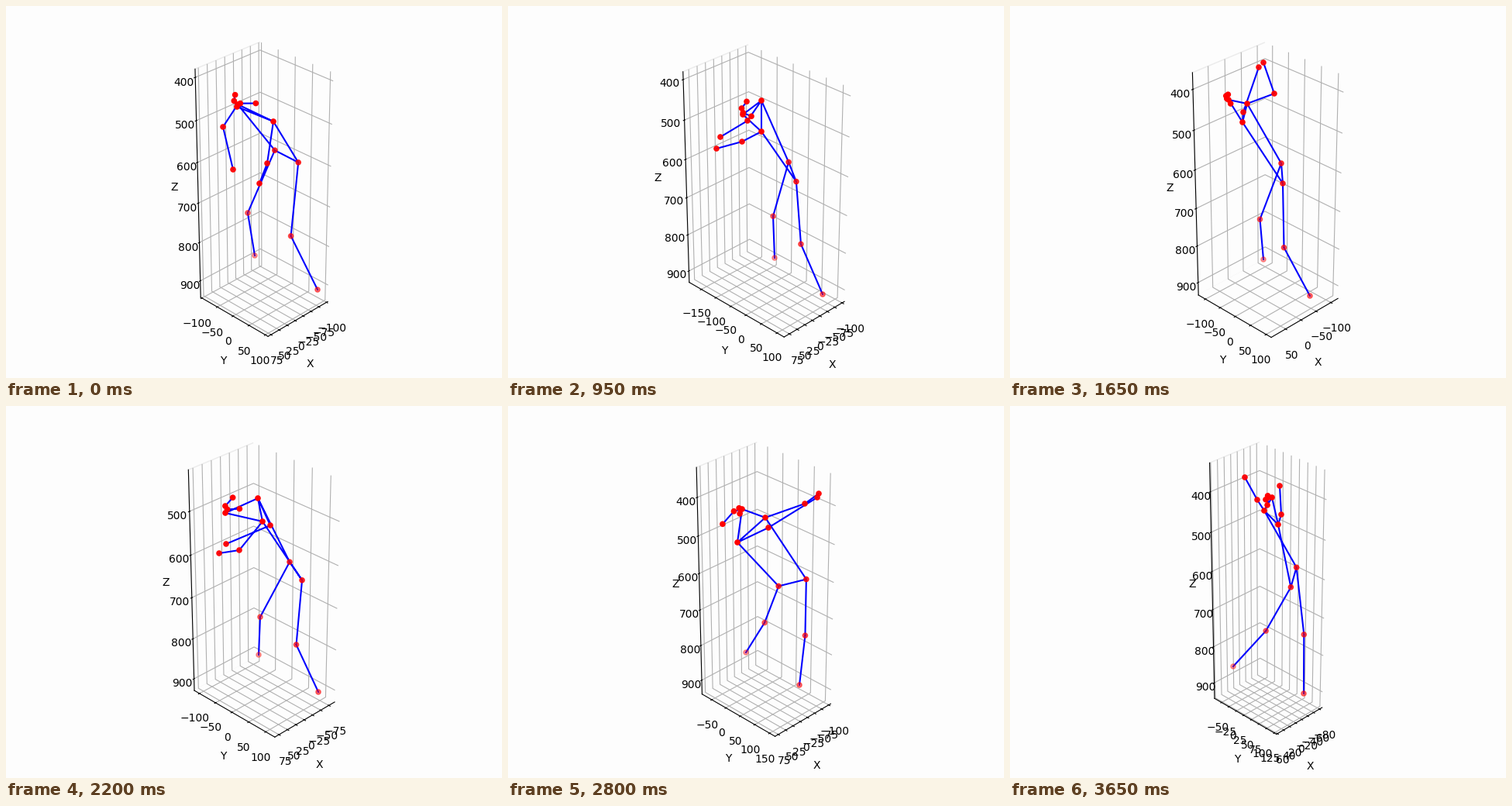
Write a matplotlib script that moves like this. It is 640x480 px and loops after 3700 ms.

```python
import numpy as np
import matplotlib.pyplot as plt
from matplotlib.animation import FuncAnimation
from matplotlib.ticker import MultipleLocator

W, H, DPI = 640, 480, 100
STEP, FRAMES = 50, 74
PAPER = "#fdfdfd"

# Key moments in ms; every track below has one entry per moment
TIMES = np.array([0, 400, 950, 1650, 2200, 2800, 3650], float)

# Axis limits
X_RANGE = [(-104, 84), (-102, 101), (-108, 92), (-124, 96),
           (-93, 87), (-107, 86), (-89, 63)]
Y_RANGE = [(-104, 108), (-98, 114), (-192, 122), (-124, 116),
           (-116, 126), (-85, 168), (-74, 132)]
Z_RANGE = [(381, 944), (387, 928), (381, 932), (360, 935),
           (408, 930), (324, 941), (330, 944)]

# Body controls in screen pixels; side A is far from the viewer at the start
NOSE = [(298, 130), (276, 132), (303, 140), (282, 121),
        (283, 138), (302, 133), (338, 118)]
FACING = [11, 17, 8, 1, 14, -14, -7]
CHEST = [(322, 138), (316, 126), (327, 142), (303, 138),
         (328, 134), (314, 160), (337, 144)]
SHOULDER = [(23, 11), (29, 1), (0, 20), (-3, 12),
            (3, 15), (18, -16), (-9, -9)]
ELBOW_A = [(280, 156), (293, 183), (309, 148), (341, 113),
           (341, 154), (336, 157), (350, 140)]
ELBOW_B = [(337, 203), (330, 187), (302, 175), (301, 137),
           (301, 186), (383, 126), (319, 121)]
WRIST_A = [(293, 211), (297, 237), (274, 169), (327, 73),
           (284, 178), (399, 118), (348, 103)]
WRIST_B = [(327, 229), (309, 241), (269, 184), (321, 79),
           (275, 190), (401, 113), (303, 92)]
PELVIS = [(362, 194), (362, 196), (367, 214), (351, 216),
          (374, 213), (367, 228), (366, 221)]
HIP_TURN = [37, 34, 75, 87, 65, -20, -79]
KNEE_BEND = [22, 11, 11, 16, 18, -3, -5]
ANKLE_A = [(321, 322), (328, 321), (344, 325), (327, 327),
           (326, 321), (307, 318), (288, 336)]
ANKLE_B = [(402, 366), (396, 367), (406, 372), (387, 374),
           (403, 369), (376, 360), (379, 371)]

# Joint order: nose, then A and B of eyes, ears, shoulders, elbows, wrists,
# hips, knees, ankles
LINKS = [(0, 1), (0, 2), (0, 5), (0, 6), (1, 3), (2, 4), (5, 6), (5, 11),
         (6, 12), (11, 12)]
LINKS += [(j, j + 2) for j in (5, 6, 7, 8, 11, 12, 13, 14)]


def glide(track, ms):
    """Smooth cubic path through the entries of a track."""
    keys = np.array(track, float)
    slopes = np.gradient(keys, TIMES, axis=0)
    i = min(np.searchsorted(TIMES, ms, side="right") - 1, len(TIMES) - 2)
    gap = TIMES[i + 1] - TIMES[i]
    u = (ms - TIMES[i]) / gap
    return (keys[i] + u * u * (3 - 2 * u) * (keys[i + 1] - keys[i])
            + gap * u * (1 - u) ** 2 * slopes[i]
            - gap * u * u * (1 - u) * slopes[i + 1])


def limits_at(ms):
    return np.array([[np.interp(ms, TIMES, side) for side in zip(*track)]
                     for track in (X_RANGE, Y_RANGE, Z_RANGE)])


def skeleton(ms):
    nose, chest, half, pelvis = (
        glide(t, ms) for t in (NOSE, CHEST, SHOULDER, PELVIS))
    skull = nose + glide(FACING, ms) * np.array([1, -0.9])
    side = 0.45 * half + (3, 0.5)
    ears = [skull - side, skull + side]
    eyes = [nose + 0.3 * (ear - nose) - 3 for ear in ears]
    arms = [glide(t, ms) for t in (ELBOW_A, ELBOW_B, WRIST_A, WRIST_B)]

    turn = np.radians(glide(HIP_TURN, ms))
    reach = np.array([19 * np.cos(turn), 13 * np.sin(turn)])
    hips = [pelvis - reach, pelvis + reach]
    ankles = [glide(ANKLE_A, ms), glide(ANKLE_B, ms)]
    bend = glide(KNEE_BEND, ms)
    knees = [(hip + ankle) / 2 + (-bend, 3 + 0.45 * abs(bend))
             for hip, ankle in zip(hips, ankles)]
    return np.array([nose, *eyes, *ears, chest - half, chest + half,
                     *arms, *hips, *knees, *ankles])


def tick_step(span):
    return next(s for s in (20, 25, 50, 100) if span * 0.96 / s <= 8)


fig = plt.figure(figsize=(W / DPI, H / DPI), dpi=DPI, facecolor=PAPER)
ax = fig.add_subplot(111, projection="3d", facecolor=PAPER)
ax.view_init(elev=30, azim=45)
ax.set(xlabel="X", ylabel="Y", zlabel="Z")
axes3 = (ax.xaxis, ax.yaxis, ax.zaxis)
for axis in axes3:
    axis.set_pane_color(PAPER)
ax.yaxis.pane.set_edgecolor("#ebebeb")

# Flat layer in pixel coordinates for the skeleton
stage = fig.add_axes([0, 0, 1, 1])
stage.set(xlim=(0, W), ylim=(H, 0))
stage.axis("off")
bones, = stage.plot([], [], color="blue", lw=1.5, zorder=2)

# Joints fade with their distance, which grows down the body
fade = [1] * 7 + [0.92] * 4 + [0.76, 0.8, 0.56, 0.64, 0.38, 0.55]
dots = stage.scatter(*skeleton(0).T, s=20, zorder=3,
                     color=[(1, 0, 0, a) for a in fade])


def update(frame):
    ms = frame * STEP
    lims = limits_at(ms)
    spans = np.ptp(lims, axis=1)
    ax.set(xlim=lims[0], ylim=lims[1], zlim=lims[2][::-1])
    ax.set_box_aspect(tuple(spans))
    for axis, span in zip(axes3, spans):
        axis.set_major_locator(MultipleLocator(tick_step(span)))

    joints = skeleton(ms)
    path = []
    for a, b in LINKS:
        path += [joints[a], joints[b], (np.nan, np.nan)]
    bones.set_data(*np.array(path).T)
    dots.set_offsets(joints)
    return bones, dots


anim = FuncAnimation(fig, update, frames=FRAMES, interval=STEP,
                     repeat=True, repeat_delay=0, blit=False)
plt.show()
```
